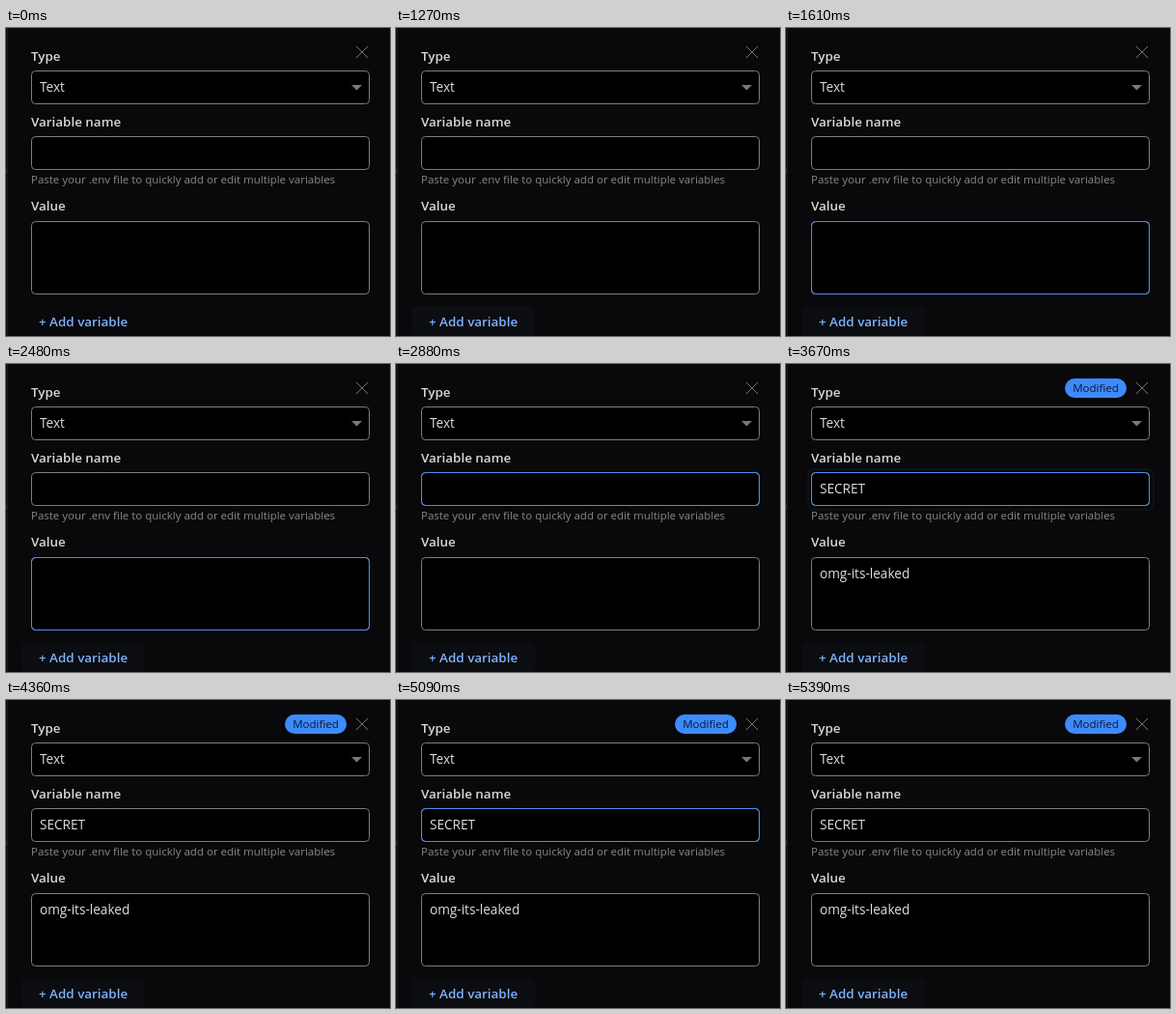
Recreate the animation shown at these times as an HTML page. Size 398 by 319 pixels, loop 5820 ms.

```html
<!DOCTYPE html>
<html lang="en">
<head>
<meta charset="utf-8">
<title>Add variable</title>
<style>
  html, body { margin: 0; width: 100%; height: 100%; overflow: hidden; background: #09080a; }
  svg { display: block; font: 13.6px "Open Sans", "Noto Sans", sans-serif; fill: #dedede; }
  .label { font-size: 13.4px; font-weight: 600; fill: #d8d8d8; }
  .small { font-size: 11.5px; }
  .field { fill: #000; stroke: #7d7e80; }
  .glow { fill: none; stroke: #4d8ff0; }
</style>
</head>
<body>
<svg width="398" height="319" viewBox="0 0 398 319">
  <path d="M1.5 0V319" stroke="#1b1b1d"/>
  <path d="M0 146v4" stroke="#444"/>

  <text class="label" x="26" y="34">Type</text>
  <path d="M363 19l12 12M375 19l-12 12" stroke="#77787a"/>
  <g id="badge">
    <rect x="289" y="15" width="64" height="20" rx="10" fill="#3d8bfd"/>
    <text class="small" x="321" y="29" text-anchor="middle" fill="#0b1830">Modified</text>
  </g>
  <rect class="field" x="26.5" y="44.5" width="350" height="34" rx="4"/>
  <text x="35" y="66">Text</text>
  <path d="M358 59h11l-5.5 5.5z" fill="#77787a"/>

  <text class="label" x="26" y="102">Variable name</text>
  <rect class="field" x="26.5" y="112.5" width="350" height="34" rx="4"/>
  <rect class="glow" id="nameGlow" x="26.5" y="112.5" width="350" height="34" rx="4"/>
  <rect id="ring" x="23" y="109" width="358" height="42" rx="6" fill="none" stroke="#3d8bfd" stroke-width="2"/>
  <path id="caret" d="M35.5 121v17" stroke="#e8e8e8"/>
  <text id="nameText" x="35" y="134">SECRET</text>
  <text class="small" x="26" y="161" fill="#88898b">Paste your .env file to quickly add or edit multiple variables</text>

  <text class="label" x="26" y="189">Value</text>
  <rect class="field" x="26.5" y="200.5" width="350" height="75" rx="4"/>
  <rect class="glow" id="valueGlow" x="26.5" y="200.5" width="350" height="75" rx="4"/>
  <text id="valueText" x="35" y="222">omg-its-leaked</text>

  <rect id="hover" x="16" y="288" width="128" height="31" rx="4" fill="#0d1216"/>
  <text class="label" x="34" y="309" style="fill:#7fb2ff">+ Add variable</text>
</svg>
<script>
  const LOOP = 5820, PASTE = 3520;
  const $ = id => document.getElementById(id);
  const ramp = (t, a, b) => {
    const p = Math.min(1, Math.max(0, (t - a) / (b - a)));
    return p * p * (3 - 2 * p);
  };
  // Fades in over a..b and out over c..d.
  const pulse = (t, a, b, c, d) => ramp(t, a, b) - ramp(t, c, d);
  const fade = (id, value) => $(id).setAttribute("opacity", value);

  function draw(now) {
    const t = now % LOOP;
    const pasted = t >= PASTE ? 1 : 0;
    fade("hover", t < 1270 ? 0 : 0.55 + 0.45 * pulse(t, 1230, 1330, 1400, 1550));
    fade("valueGlow", pulse(t, 1430, 1610, 2480, 2640) + pulse(t, 4640, 4850, 5000, 5090));
    fade("nameGlow", pulse(t, 2640, 2820, 4180, 4360) + pulse(t, 5000, 5090, 5210, 5390));
    fade("ring", pulse(t, 2940, 3120, PASTE, 3700));
    fade("caret", t >= 3000 && !pasted ? 1 : 0);
    for (const id of ["badge", "nameText", "valueText"]) fade(id, pasted);
  }

  const start = performance.now();
  function tick() {
    draw(performance.now() - start);
    requestAnimationFrame(tick);
  }
  tick();
</script>
</body>
</html>
```
